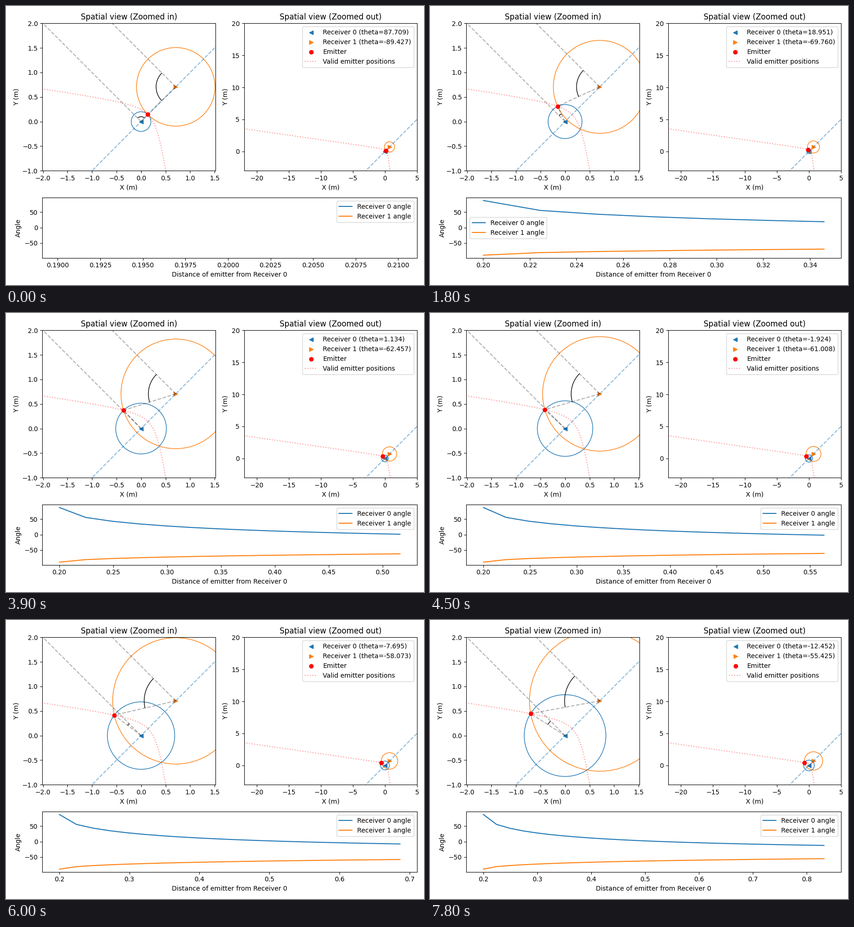
A matplotlib script that plays this animation: 900x600 px, repeating every 8 s.

```python
import numpy as np
import matplotlib.pyplot as plt
from matplotlib.animation import FuncAnimation
from matplotlib.patches import Circle

W, H = 900, 600
STEP_FRAMES = 3          # each pose is held for 3 ticks of 100 ms
TICK_MS, TICKS = 100, 80

# Axes edges in pixels, measured from the top left of the stage
LEFT, RIGHT, MID_LEFT, MID_RIGHT = 78.28, 885, 450.51, 512.78
TOP, VIEW_BOTTOM, GRAPH_TOP, GRAPH_BOTTOM = 37.33, 354.17, 412.45, 541.72

RANGE_GAP = 0.6          # extra distance from the emitter to receiver 1
RX0 = np.zeros(2)
RX1 = np.full(2, np.sqrt(0.5))
NORMAL = 135             # direction both receivers face, degrees

fig = plt.figure(figsize=(W / 100, H / 100), dpi=100)


def unit(deg):
    return np.array([np.cos(np.radians(deg)), np.sin(np.radians(deg))])


def add_axes(left, top, right, bottom):
    return fig.add_axes([left / W, 1 - bottom / H,
                         (right - left) / W, (bottom - top) / H])


def set_equal_limits(ax, x_mid, y_min, y_max):
    box = ax.get_position()
    half = (y_max - y_min) * box.width * W / (box.height * H) / 2
    ax.set_xlim(x_mid - half, x_mid + half)
    ax.set_ylim(y_min, y_max)


# Geometry for every step: law of cosines with receivers one metre apart
dist0 = np.linspace(0.2001, 2.0, 75)
dist1 = dist0 + RANGE_GAP
theta0 = np.degrees(np.arcsin((dist0**2 + 1 - dist1**2) / (2 * dist0)))
theta1 = -np.degrees(np.arcsin((dist1**2 + 1 - dist0**2) / (2 * dist1)))

# Hyperbola branch around receiver 0
t = np.linspace(5, -5, 2000)
semi_a, semi_b = RANGE_GAP / 2, np.sqrt(0.25 - RANGE_GAP**2 / 4)
branch = ((RX0 + RX1)[:, None] / 2
          - semi_a * np.cosh(t) * unit(45)[:, None]
          + semi_b * np.sinh(t) * unit(NORMAL)[:, None])


class SpatialView:
    def __init__(self, ax, title):
        self.ax = ax
        ax.set(title=title, xlabel="X (m)", ylabel="Y (m)")
        self.rx0 = ax.scatter(*RX0, marker="<", color="C0")
        self.rx1 = ax.scatter(*RX1, marker=">", color="C1")
        self.emitter = ax.scatter([0], [0], color="r", zorder=3)
        self.valid, = ax.plot(*branch, "r:", alpha=0.4)
        ax.plot([-100, 100], [-100, 100], color="C0", ls="--", alpha=0.5)
        self.circles = [ax.add_patch(Circle(rx, 1, fill=False, ec=color))
                        for rx, color in ((RX0, "C0"), (RX1, "C1"))]

    def update(self, position, radii):
        self.emitter.set_offsets([position])
        for circle, radius in zip(self.circles, radii):
            circle.set_radius(radius)


near = SpatialView(add_axes(LEFT, TOP, MID_LEFT, VIEW_BOTTOM),
                   "Spatial view (Zoomed in)")
far = SpatialView(add_axes(MID_RIGHT, TOP, RIGHT, VIEW_BOTTOM),
                  "Spatial view (Zoomed out)")

rays, arcs = [], []
for rx in (RX0, RX1):
    end = rx + 10 * unit(NORMAL)
    near.ax.plot(*zip(rx, end), "k--", alpha=0.3)
    rays += near.ax.plot([], [], "k--", alpha=0.3)
    arcs += near.ax.plot([], [], "k", lw=1, solid_capstyle="butt", zorder=1)

set_equal_limits(near.ax, -0.25, -1, 2)
set_equal_limits(far.ax, -8.5, -3, 20)

graph = add_axes(LEFT, GRAPH_TOP, RIGHT, GRAPH_BOTTOM)
graph.set(xlabel="Distance of emitter from Receiver 0", ylabel="Angle")
curve0, = graph.plot([], [], label="Receiver 0 angle")
curve1, = graph.plot([], [], label="Receiver 1 angle")


def update(tick):
    i = tick // STEP_FRAMES
    radii = dist0[i], dist1[i]
    thetas = theta0[i], theta1[i]
    position = dist0[i] * unit(NORMAL - theta0[i])

    for view in (near, far):
        view.update(position, radii)
    for rx, radius, theta, ray, arc in zip((RX0, RX1), radii, thetas, rays, arcs):
        ray.set_data(*zip(rx, position))
        sweep = unit(np.linspace(NORMAL, NORMAL - theta, 60))
        arc.set_data(*(rx[:, None] + radius / 2 * sweep))

    far.ax.legend(
        [far.rx0, far.rx1, far.emitter, far.valid],
        [f"Receiver 0 (theta={thetas[0]:.3f})",
         f"Receiver 1 (theta={thetas[1]:.3f})",
         "Emitter", "Valid emitter positions"],
        loc="upper right")

    curve0.set_data(dist0[:i + 1], theta0[:i + 1])
    curve1.set_data(dist0[:i + 1], theta1[:i + 1])
    graph.relim()
    graph.autoscale_view()
    graph.legend(loc="best")
    return []


anim = FuncAnimation(fig, update, frames=TICKS, interval=TICK_MS,
                     init_func=lambda: update(0), repeat=True, repeat_delay=0)
plt.show()
```
